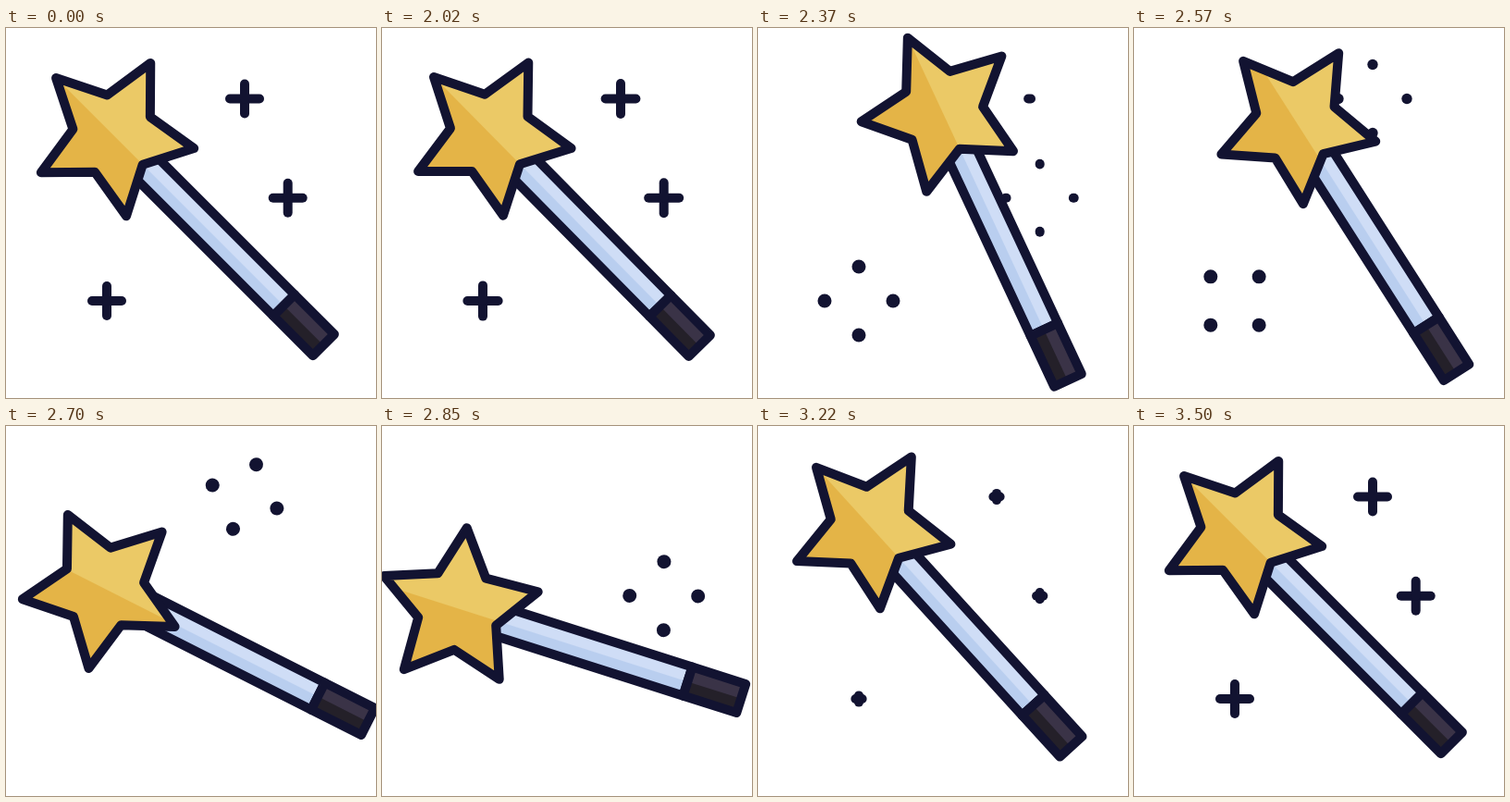
Animation of 400 by 400 pixels, one loop 3520 ms. Source, as an HTML page with a canvas:

```html
<!DOCTYPE html>
<html lang="en">
<head>
<meta charset="utf-8">
<title>Magic wand</title>
<style>
  html, body { margin: 0; height: 100%; overflow: hidden; background: #fff; }
  canvas { display: block; width: 100vw; height: 100vh; }
</style>
</head>
<body>
<canvas id="stage" width="400" height="400"></canvas>
<script>
const ctx = document.getElementById('stage').getContext('2d');
const LOOP = 3520;
const INK = '#121331';
const DEG = Math.PI / 180;
const pivot = { x: 256, y: 240 };
const hub = 116.3;    // centre of the star, both axes
const halfWidth = 16.3;
const reach = 37;     // distance the sparkle dots fly out
const sparkles = [{ x: 109, y: 295 }, { x: 304.7, y: 183.7 }, { x: 258, y: 76.5 }];

const ease = (t, from, to) => {
  const u = Math.min(1, Math.max(0, (t - from) / (to - from)));
  return u * u * (3 - 2 * u);
};

function fourWays(s, angle, draw) {
  for (let i = 0; i < 4; i++) {
    ctx.save();
    ctx.translate(s.x, s.y);
    ctx.rotate((angle + i * 90) * DEG);
    ctx.beginPath();
    draw();
    ctx.restore();
  }
}

function arms(s, inner, outer) {
  fourWays(s, 0, () => {
    ctx.moveTo(inner, 0);
    ctx.lineTo(outer, 0);
    ctx.stroke();
  });
}

// A plus bursts into four dashes, returns as turning dots, then regrows
function drawSparkle(s, i, t) {
  const burst = t - 2000;
  const split = 372 + 40 * i;
  if (burst < split) {
    arms(s, reach * ease(burst, 0, split), 16 + (reach - 16) * ease(burst, 0, split * 0.66));
  } else if (t > 3130) {
    arms(s, 0, 16 * ease(t, 3125, 3450));
  }
  const age = t - 2325 - 225 * (2 * i % 3);
  if (age > 0 && age < 300) {
    const radius = 7.5 * Math.min(1, age / 33, (300 - age) / 50);
    fourWays(s, 45 * ease(age, 65, 250), () => {
      ctx.arc(reach, 0, radius, 0, 7);
      ctx.fillStyle = INK;
      ctx.fill();
    });
  }
}

// Fills a path in two tones, the light one on the upper side of the wand's axis
function twoTone(path, dark, light) {
  ctx.save();
  ctx.clip(path);
  ctx.fillStyle = dark;
  ctx.fillRect(-100, -100, 500, 200);
  ctx.fillStyle = light;
  ctx.fillRect(-100, -100, 500, 99.8);
  ctx.restore();
  ctx.stroke(path);
}

function bar(from, to) {
  const path = new Path2D();
  path.rect(from, -halfWidth - 0.5, to - from, halfWidth * 2);
  return path;
}

function starPath(spin) {
  const path = new Path2D();
  for (let i = 0; i < 10; i++) {
    const angle = (180 + 36 * i + spin) * DEG;
    const radius = i % 2 ? 44.4 : 88;
    path.lineTo(radius * Math.cos(angle), radius * Math.sin(angle));
  }
  path.closePath();
  return path;
}

function drawWand(t) {
  const turn = 20 * ease(t, 2000, 2300) - 50 * ease(t, 2505, 2790)
    + 33.2 * ease(t, 2790, 3135) - 3.2 * ease(t, 3135, 3490);
  const shift = ease(t, 2000, 2300) - ease(t, 2480, 3020);
  const spin = -72 * ease(t, 2480, 2932);
  ctx.save();
  ctx.translate(pivot.x + 32 * shift, pivot.y + 14.5 * shift);
  ctx.rotate(turn * DEG);
  ctx.translate(hub - pivot.x, hub - pivot.y);
  ctx.rotate(45 * DEG);
  twoTone(bar(28, 260), '#b9ceef', '#cfddf6');
  twoTone(bar(260, 320.6), '#242029', '#3a3347');
  twoTone(starPath(spin), '#e4b447', '#ebc966');
  ctx.restore();
}

function frame() {
  const now = performance.now() % LOOP;
  // 40 steps a second, held alternately for 20 and 30 ms
  const t = Math.floor(now / 50) * 50 + (now % 50 >= 20 ? 25 : 0);
  ctx.fillStyle = '#fff';
  ctx.fillRect(0, 0, 400, 400);
  ctx.strokeStyle = INK;
  ctx.lineWidth = 10;
  ctx.lineCap = ctx.lineJoin = 'round';
  sparkles.forEach((s, i) => drawSparkle(s, i, t));
  drawWand(t);
  requestAnimationFrame(frame);
}
frame();
</script>
</body>
</html>
```
